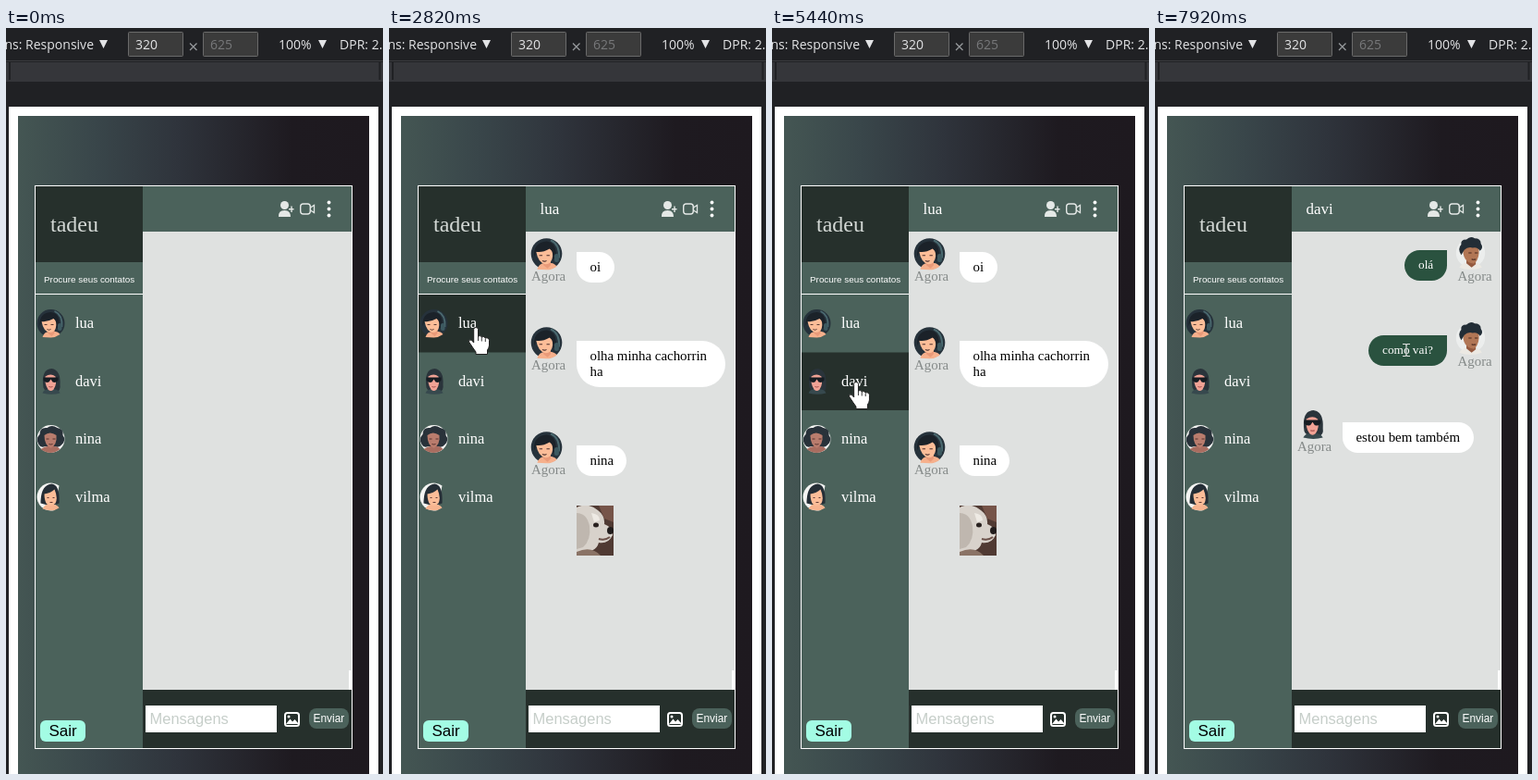
Recreate the animation shown at these times as an HTML page. Size 408 by 806 pixels, loop 7990 ms.

```html
<!DOCTYPE html>
<html lang="pt">
<head>
<meta charset="utf-8">
<title>Chat</title>
<style>
html, body { margin: 0; width: 100%; height: 100%; overflow: hidden; background: #202124; }
svg { display: block; width: 100vw; height: 100vh; }
text { white-space: pre; }
.ui { font-family: "Open Sans", "Noto Sans", sans-serif; font-size: 14px; fill: #e3e4e6; }
.sans { font-family: "Liberation Sans", Arial, sans-serif; }
.serif { font-family: "Liberation Serif", "Times New Roman", serif; }
.name { font-size: 16.5px; fill: #fff; }
.msg { font-size: 14.9px; fill: #000; }
.mine { font-size: 13.3px; fill: #fff; }
.when { font-size: 14.9px; fill: #858a89; }
</style>
</head>
<body>
<svg viewBox="0 0 408 806" preserveAspectRatio="none">
  <defs>
    <linearGradient id="page">
      <stop offset="0" stop-color="#445653"/>
      <stop offset=".22" stop-color="#39464a"/>
      <stop offset=".45" stop-color="#2f343c"/>
      <stop offset=".78" stop-color="#1e1a20"/>
      <stop offset="1" stop-color="#1e191f"/>
    </linearGradient>

    <g id="headphones">
      <circle r="15" fill="#26323b"/>
      <path d="M-9 15Q-7 8 0 9Q7 8 10 12Q5 15.5 0 15.5Z" fill="#f6b08c"/>
      <path d="M-3 6H4V11L1 14L-3 11Z" fill="#e99a79"/>
      <path d="M-10-2Q-6-7 1-6Q7-5 6 2Q5 10-1 10Q-8 9-10-2Z" fill="#fcbd98"/>
      <path d="M-12 3Q-13-11 0-12Q10-11 9 3L6 6Q7-2 3-5Q-4-1-10-2Z" fill="#1b2229"/>
      <path d="M4-13Q13-9 12 4" fill="none" stroke="#4b6a70" stroke-width="1.8"/>
      <rect x="7.5" y="0" width="4.5" height="8" rx="2" fill="#3d5960"/>
      <path d="M-7 1.5h3M0 1.5h3M-4 6.5q2 1.5 4 0" fill="none" stroke="#4a2f2c" stroke-width=".9"/>
    </g>
    <g id="shades">
      <path d="M-8 7Q-11-13 1-13.500Q11-12 10 4Q11 10 6 12Q-6 13-8 7Z" fill="#2a343b"/>
      <path d="M-9 13Q-7 8 0 9Q8 8 10 13Q1 15.500-9 13Z" fill="#37494e"/>
      <path d="M-6-5Q0-9 5-5Q7 3 3 9Q0 12-3 9Q-7 3-6-5Z" fill="#f1a295"/>
      <path d="M-8-4H8V-1Q6 2.500 2 1L0-2L-2 1Q-6 2.500-8-1Z" fill="#161c22"/>
      <path d="M-2 6q2 1 4 0" fill="none" stroke="#a34e4c"/>
    </g>
    <g id="afro">
      <circle r="15" fill="#f4f4f2"/>
      <path d="M-13 6Q-17 0-12-5Q-12-13-4-12Q1-16 7-12Q14-11 13-4Q17 1 12 6Q9 10 4 8H-6Q-11 10-13 6Z" fill="#29323a"/>
      <path d="M-11 11Q-5 7 0 8Q6 7 10 11Q0 19-11 11Z" fill="#a96d60"/>
      <path d="M-7-4Q-1-9 6-4Q7 6 0 10Q-7 7-7-4Z" fill="#b97c6d"/>
      <path d="M-5 0h3M2 0h3M-2 5.500q2 1 4 0" fill="none" stroke="#56302c"/>
    </g>
    <g id="bob">
      <path d="M9-12A15 15 0 1 0 4 14.500Z" fill="#f4f4f2"/>
      <path d="M-11 7Q-11-13 1-14Q10-13 9 7Q1 11-11 7Z" fill="#252e36"/>
      <path d="M-9 13Q-6 7 0 8Q7 8 9 12Q2 17-9 13Z" fill="#f7b48f"/>
      <path d="M-7-3Q0-4 4-8Q8 1 5 7Q0 12-5 7Q-7 3-7-3Z" fill="#fcbd98"/>
      <path d="M-4 1h2M2 1h2M-1 6h3" stroke="#633a35"/>
    </g>
    <g id="curly">
      <circle r="14" fill="#eceeed"/>
      <path d="M-11 14Q-7 8 0 9Q8 8 11 14Q0 18-11 14Z" fill="#ece9e3"/>
      <path d="M-4 5H5V11L1 14L-4 10Z" fill="#94593f"/>
      <path d="M-7-6Q0-9 8-5Q9 5 4 10Q-1 11-5 6Q-8 2-7-6Z" fill="#b17655"/>
      <path d="M-9 2Q-13-4-9-8Q-10-13-4-13Q0-17 4-14Q10-14 10-9Q13-5 9-2Q7-6 2-5Q-3-6-6-3Z" fill="#222d36"/>
      <path d="M-2 0h3M4 0h3M1 6q2 1 4 0" fill="none" stroke="#49291f"/>
    </g>
  </defs>

  <!-- Browser toolbar -->
  <rect width="408" height="806" fill="#202124"/>
  <path d="M0 35.500H408" stroke="#3b3c3f"/>
  <rect y="37" width="408" height="21" fill="#35363a"/>
  <path d="M4 37V56M404.500 37V56" stroke="#202124" stroke-width="2"/>
  <g class="ui">
    <text x="95" y="23" text-anchor="end">ns: Responsive</text>
    <text x="295" y="23">100%</text>
    <text x="361" y="23">DPR: 2.</text>
    <path d="M101 13H110L105.500 22ZM338 13H347L342.500 22Z"/>
    <rect x="132.500" y="4.500" width="59" height="26" rx="1" fill="#3b3b3b" stroke="#6a6a6a"/>
    <rect x="213.500" y="4.500" width="59" height="26" rx="1" fill="#3b3b3b" stroke="#6a6a6a"/>
    <text x="140" y="23">320</text>
    <text x="221" y="23" fill="#77787a" style="fill:#77787a">625</text>
    <path d="M199 16.500L206.500 24M206.500 16.500L199 24" stroke="#96999c" stroke-width="1.3"/>
  </g>

  <!-- Page -->
  <rect x="3" y="85" width="400" height="721" fill="#fff"/>
  <rect x="13" y="95" width="380" height="711" fill="url(#page)"/>
  <rect x="31.500" y="170.500" width="343" height="608" fill="#4b625b" stroke="#fff"/>
  <rect x="32" y="171" width="116" height="82" fill="#26302c"/>
  <text class="serif" x="48" y="220" font-size="24" fill="#d3d8d5">tadeu</text>
  <text class="sans" x="41" y="275" font-size="9.900" fill="#fff">Procure seus contatos</text>
  <path d="M32 287.500H148" stroke="#fff"/>
  <g id="contacts"></g>
  <rect x="37" y="748" width="49" height="23" rx="6" fill="#a3fce4"/>
  <text class="sans" x="46.500" y="765" font-size="17">Sair</text>

  <rect x="148" y="220" width="226" height="495" fill="#dfe1e0"/>
  <rect x="371" y="694" width="3" height="21" fill="#fff"/>
  <g fill="#e4e8e6">
    <circle cx="301.500" cy="191.500" r="4.500"/>
    <path d="M295 204Q294.500 197 301.500 197Q308 197 308 204Z"/>
    <path d="M309 192.500V199M306 195.700H311.500" stroke="#e4e8e6" stroke-width="1.400"/>
    <rect x="318.700" y="190" width="10.600" height="11" rx="3" fill="none" stroke="#e4e8e6" stroke-width="1.400"/>
    <path d="M329.500 194L333.500 191.500V199.500L329.500 197Z" fill="none" stroke="#e4e8e6" stroke-width="1.300"/>
    <g fill="#fff"><circle cx="349.500" cy="188.500" r="1.900"/><circle cx="349.500" cy="195.500" r="1.900"/><circle cx="349.500" cy="202.500" r="1.900"/></g>
  </g>
  <text id="title" class="serif" x="163.500" y="201" font-size="17" fill="#fff"></text>
  <g id="chatA"></g>
  <g id="chatB"></g>

  <rect x="148" y="715" width="226" height="63" fill="#26302c"/>
  <rect x="151" y="732" width="142" height="29" fill="#fff"/>
  <text class="sans" x="155.500" y="752" font-size="16.500" fill="#c6cec9">Mensagens</text>
  <rect x="302" y="740" width="15" height="14" rx="2.500" fill="none" stroke="#fff" stroke-width="2"/>
  <path d="M303 752L307.500 746.500L310 749.500L312.500 747L317 752Z" fill="#fff"/>
  <circle cx="306" cy="744" r="1.500" fill="#fff"/>
  <rect x="328" y="735" width="43" height="22" rx="8" fill="#4b625b"/>
  <text class="sans" x="332.500" y="750" font-size="11.900" fill="#fff">Enviar</text>

  <g id="cursor">
    <path id="arrow" d="M.5 .8V21.500L5.300 17L8.500 25L12 23.500L8.800 15.800H15.300Z" fill="#fff" stroke="#222" stroke-width="1"/>
    <g id="hand">
      <path d="M-2.300 2.500Q-2 .5 0 .5Q2.300 .5 2.500 2.500V10Q5 8.800 6.300 10.800Q9 9.800 10.300 12Q14 11 14.500 14.500V20Q14 23 12.500 25V29.500H1V27Q-3 23-5.500 18.500Q-8.500 15.500-7 14Q-5-.5 14-2.300 17Z" fill="none"/>
      <path d="M-2.300 17V2.500Q-2 .5 0 .5Q2.300 .5 2.500 2.500V10Q5 8.800 6.300 10.800Q9 9.800 10.300 12Q14 11 14.500 14.500V20Q14 23 12.500 25V29.500H0V27Q-3 23-5.500 19Q-8.800 15.500-7 14Q-5 13-2.300 17Z" fill="#fff" stroke="#222"/>
      <path d="M2.500 10V15M6.300 11V15.500M10.300 12.500V16" stroke="#222" stroke-width=".9"/>
    </g>
    <path id="beam" d="M-4-6.500H-1L0-5.500L1-6.500H4M0-5.500V5.500M-4 6.500H-1L0 5.500L1 6.500H4" fill="none" stroke="#dfe1e0" stroke-width="1.200"/>
  </g>
</svg>
<script>
const LOOP = 7990, FADE = 500;
const $ = id => document.getElementById(id);
const show = (id, on) => $(id).setAttribute('display', on ? 'inline' : 'none');

const avatar = (id, x, y, scale = 1) => `<use href="#${id}" transform="translate(${x} ${y}) scale(${scale})"/>`;
const label = (cls, x, y, s) => `<text class="serif ${cls}" x="${x}" y="${y}">${s}</text>`;

// Rounded bubble with one square corner, on the side facing its avatar.
function bubble(x, y, w, h, mine) {
  const r = h / 2, arc = (dx, dy) => `a${r} ${r} 0 0 1 ${dx} ${dy}`;
  const d = mine
    ? `M${x + r} ${y}H${x + w}v${r}${arc(-r, r)}H${x + r}${arc(-r, -r)}${arc(r, -r)}Z`
    : `M${x} ${y}H${x + w - r}${arc(r, r)}${arc(-r, r)}H${x + r}${arc(-r, -r)}Z`;
  return `<path d="${d}" fill="${mine ? '#2a523f' : '#fff'}"/>`;
}

function received(face, y, w, lines) {
  return avatar(face, 170.5, y, 1.12) + label('when', 154, y + 29, 'Agora') +
    bubble(203, y - 2, w, 16 + 17 * lines.length, false) +
    lines.map((s, i) => label('msg', 217.5, y + 19 + 17 * i, s)).join('');
}

function sent(y, x, s) {
  return avatar('curly', 341.5, y, 1.12) + label('when', 327.5, y + 30, 'Agora') +
    bubble(x, y - 3, 316 - x, 33, true) + label('mine', x + 15, y + 17, s);
}

const dog = `<svg id="photo" x="203" y="516" width="40" height="54" viewBox="0 0 40 54">
  <rect width="40" height="54" fill="#503a33"/>
  <path d="M24 0H40V18L30 14Z" fill="#765449"/>
  <path d="M0 2Q12-4 23 5Q31 11 30 20Q40 24 39 32Q34 42 24 40Q21 52 0 51Z" fill="#d8d2cb"/>
  <path d="M0 8Q11 8 14 22Q16 37 7 45L0 47Z" fill="#bfb7af"/>
  <path d="M16 8Q25 9 25 16L19 18Z" fill="#eeeae4"/>
  <ellipse cx="21" cy="21" rx="3" ry="2.500" fill="#29211f"/>
  <ellipse cx="36.500" cy="27" rx="3.500" ry="4" fill="#211c1c"/>
  <path d="M24 36Q31 38 36 34" fill="none" stroke="#6c5149" stroke-width="2"/>
  <path d="M0 50Q16 43 26 54H0Z" fill="#8a7366"/></svg>`;

$('contacts').innerHTML = [['lua', 'headphones'], ['davi', 'shades'], ['nina', 'afro'], ['vilma', 'bob']]
  .map(([name, face], i) => {
    const y = 288 + 62.5 * i;
    return `<rect id="row${i}" x="32" y="${y}" width="116" height="62.500" fill="#26302c" opacity="0"/>` +
      avatar(face, 48.5, y + 31) + label('name', 75, y + 36, name);
  }).join('');

$('chatA').innerHTML = received('headphones', 244, 41, ['oi']) +
  received('headphones', 340, 161, ['olha minha cachorrin', 'ha']) +
  received('headphones', 453, 54, ['nina']) + dog;
$('chatB').innerHTML = sent(243, 270, 'olá') + sent(335, 231, 'como vai?') +
  received('shades', 428, 142, ['estou bem também']);

// Pointer trips: [time, x, y]; each trip's last position holds until the next one.
const trips = [
  [[390, 400, 788], [460, 393, 766], [530, 420, 780]],
  [[870, 400, 559], [1080, 335, 500], [1290, 264, 440], [1500, 205, 391], [1640, 177, 371],
   [1850, 139.5, 353.5], [2060, 117, 338], [2300, 98, 326], [2470, 94, 323]],
  [[2930, 94, 323], [3140, 121, 312], [3420, 156, 299], [3770, 173, 279], [3840, 176, 278],
   [4050, 174, 292], [4330, 164, 327], [4600, 162, 356], [4670, 169, 385], [4740, 173, 420],
   [4810, 171, 433], [4880, 162, 414], [4950, 147, 404], [5160, 117, 388], [5440, 91, 382], [5510, 87, 383]],
  [[6320, 87, 383], [6480, 112, 372], [6660, 150, 352], [6880, 206, 304], [7160, 260, 259],
   [7230, 266, 255], [7400, 276, 264], [7600, 277, 293], [7860, 273, 337], [7920, 272, 348]]
];

function pointerAt(t) {
  const trip = trips.filter(p => p[0][0] <= t).pop();
  if (!trip) return [-99, -99];
  const i = trip.findIndex(p => p[0] > t);
  if (i < 0) return trip[trip.length - 1].slice(1);
  const [a, b] = [trip[i - 1], trip[i]], k = (t - a[0]) / (b[0] - a[0]);
  return [a[1] + (b[1] - a[1]) * k, a[2] + (b[2] - a[2]) * k];
}

// The CSS "ease" curve, solved by bisection.
function ease(x) {
  if (x <= 0) return 0;
  if (x >= 1) return 1;
  const bez = (u, p, q) => 3 * u * (1 - u) ** 2 * p + 3 * u * u * (1 - u) * q + u ** 3;
  let lo = 0, hi = 1;
  for (let i = 0; i < 20; i++) {
    const mid = (lo + hi) / 2;
    if (bez(mid, .25, .25) < x) lo = mid; else hi = mid;
  }
  return bez(lo, .1, 1);
}

const hover = (t, on, off) => ease((Math.min(t, off) - on) / FADE) * (1 - ease((t - off) / FADE));
const inside = (x, y, l, t, r, b) => x >= l && x < r && y >= t && y < b;

function render(t) {
  $('row0').setAttribute('opacity', hover(t, 1895, 3340));
  $('row1').setAttribute('opacity', hover(t, 1800, 1895) + hover(t, 4945, 6650));
  $('title').textContent = t < 2600 ? '' : t < 5970 ? 'lua' : 'davi';

  const first = t >= 2820 && t < 6040, second = t >= 6040;
  show('chatA', first);
  show('photo', t >= 3000);
  show('chatB', second);

  const [x, y] = pointerAt(t);
  const hand = inside(x, y, 32, 288, 148, 538);
  const beam = first && inside(x, y, 154, 357, 191, 374) || second && inside(x, y, 246, 340, 301, 356);
  show('hand', hand);
  show('beam', beam);
  show('arrow', !hand && !beam);
  $('cursor').setAttribute('transform', `translate(${x} ${y})`);
}

const start = performance.now();
function tick() {
  render((performance.now() - start) % LOOP);
  requestAnimationFrame(tick);
}
tick();
</script>
</body>
</html>
```
